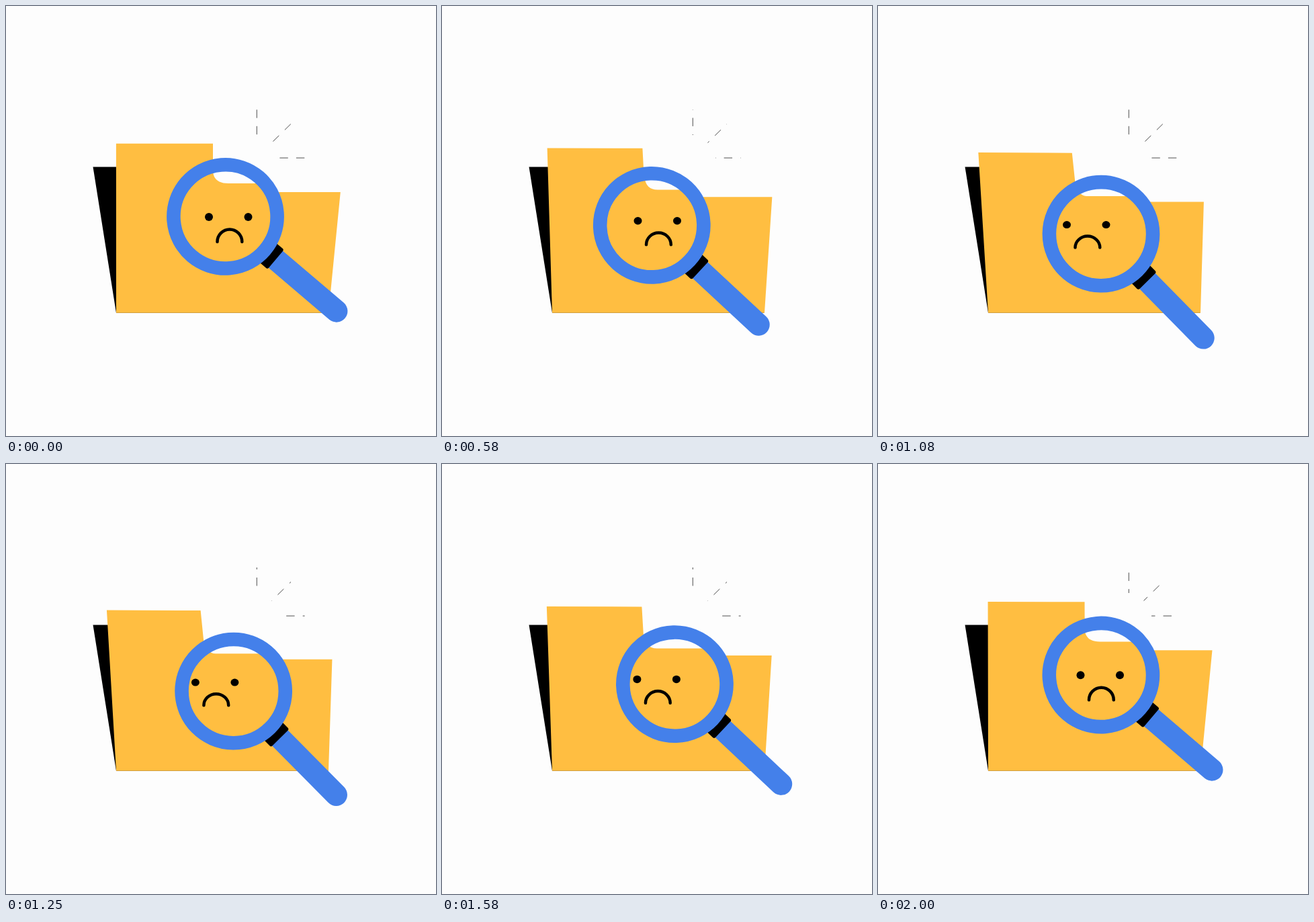
An HTML page for the animation above (2080 ms loop, 640 px wide and 640 px high).

```html
<!DOCTYPE html>
<html lang="en">
<head>
<meta charset="utf-8">
<title>Nothing found</title>
<style>
  html, body { margin: 0; width: 100%; height: 100%; overflow: hidden; background: #fdfdfd; }
  svg { display: block; width: 100%; height: 100%; }
</style>
</head>
<body>
<svg viewBox="0 0 640 640">
  <defs>
    <clipPath id="glass"><circle id="glassHole" r="72"/></clipPath>
  </defs>
  <rect width="640" height="640" fill="#fdfdfd"/>
  <path d="M129.5 239.5H200L480 456.8H164Z"/>
  <path id="folder" fill="#ffbe41"/>
  <g clip-path="url(#glass)">
    <rect width="640" height="640" fill="#fdfdfd"/>
    <path id="seen" fill="#ffbe41"/>
  </g>
  <ellipse id="eyeL" rx="6"/>
  <ellipse id="eyeR" rx="6"/>
  <path id="mouth" fill="none" stroke="#000" stroke-width="4.5" stroke-linecap="round"/>
  <g id="rays" fill="none" stroke="#222" stroke-width=".8" stroke-dasharray="12.4 12.1">
    <path d="M373.3 154V192"/>
    <path d="M424 175.5L395.5 203.5"/>
    <path d="M444.6 226.1H407"/>
  </g>
  <g id="magnifier">
    <path d="M92 0H217.2" stroke="#4480ea" stroke-width="33" stroke-linecap="round"/>
    <rect x="76" y="-19" width="22.5" height="38" rx="3"/>
    <circle r="77.1" fill="none" stroke="#4480ea" stroke-width="20.6"/>
  </g>
</svg>
<script>
const LOOP = 2080, FPS = 12, STEPS = 25;
const POSES = 60;            // poses in one full swing
const DASH_PERIOD = 24.5, POSES_PER_DASH = 10;

const el = id => document.getElementById(id);
const set = (id, attrs) => {
  for (const name in attrs) el(id).setAttribute(name, attrs[name]);
};

// The picture changes at 12 fps, with starts rounded to 10 ms.
function stepAt(ms) {
  let k = STEPS - 1;
  while (Math.round(k * 100 / FPS) * 10 > ms) k--;
  return k;
}

// Each step shows a whole pose; the swing sets off slowly.
const poseAt = step => Math.max(step, Math.floor(2.45 * step - 1.8));

function draw(pose) {
  const angle = pose / POSES * 2 * Math.PI;
  const p = (1 - Math.cos(angle)) / 2;
  const pt = (x, y, dx, dy) => `${x + dx * p} ${y + dy * p}`;

  const tab = `M164 456.8L${pt(163.9, 204.8, -14.6, 13.2)}L${pt(308, 204.8, -19.2, 13.9)}`;
  set('folder', {
    d: `${tab}L${pt(308, 277, -11.5, 14.5)}L${pt(497.8, 277, -12.9, 14.5)}L480 456.8Z`
  });
  set('seen', {
    d: `${tab}L${pt(308, 244, -13, 20)}Q${pt(308, 264, -10, 19)} ${pt(331, 264, -20, 19)}H520V456.8Z`
  });

  const shift = -21 * p;
  const eye = { cy: 314 + 11.6 * p, ry: 6 - 0.5 * p };
  set('eyeL', { cx: 302 + shift, ...eye });
  set('eyeR', { cx: 360.5 + shift, ...eye });
  const mouthX = 332.9 + shift, mouthY = 351 + 8.6 * p;
  set('mouth', {
    d: `M${mouthX - 18.4} ${mouthY}A18.4 ${18.5 - 1.5 * p} 0 0 1 ${mouthX + 18.4} ${mouthY}`
  });

  const lensX = 329.25 - 17.2 * Math.sin(angle + 0.16);
  const lensY = 313.4 + 25.8 * p;
  set('glassHole', { cx: lensX, cy: lensY });
  set('magnifier', {
    transform: `translate(${lensX} ${lensY}) rotate(${40.4 + 5.1 * p})`
  });

  set('rays', { 'stroke-dashoffset': DASH_PERIOD * pose / POSES_PER_DASH - 0.3 });
}

const start = performance.now();
function tick() {
  draw(poseAt(stepAt((performance.now() - start) % LOOP)));
  requestAnimationFrame(tick);
}
tick();
</script>
</body>
</html>
```
